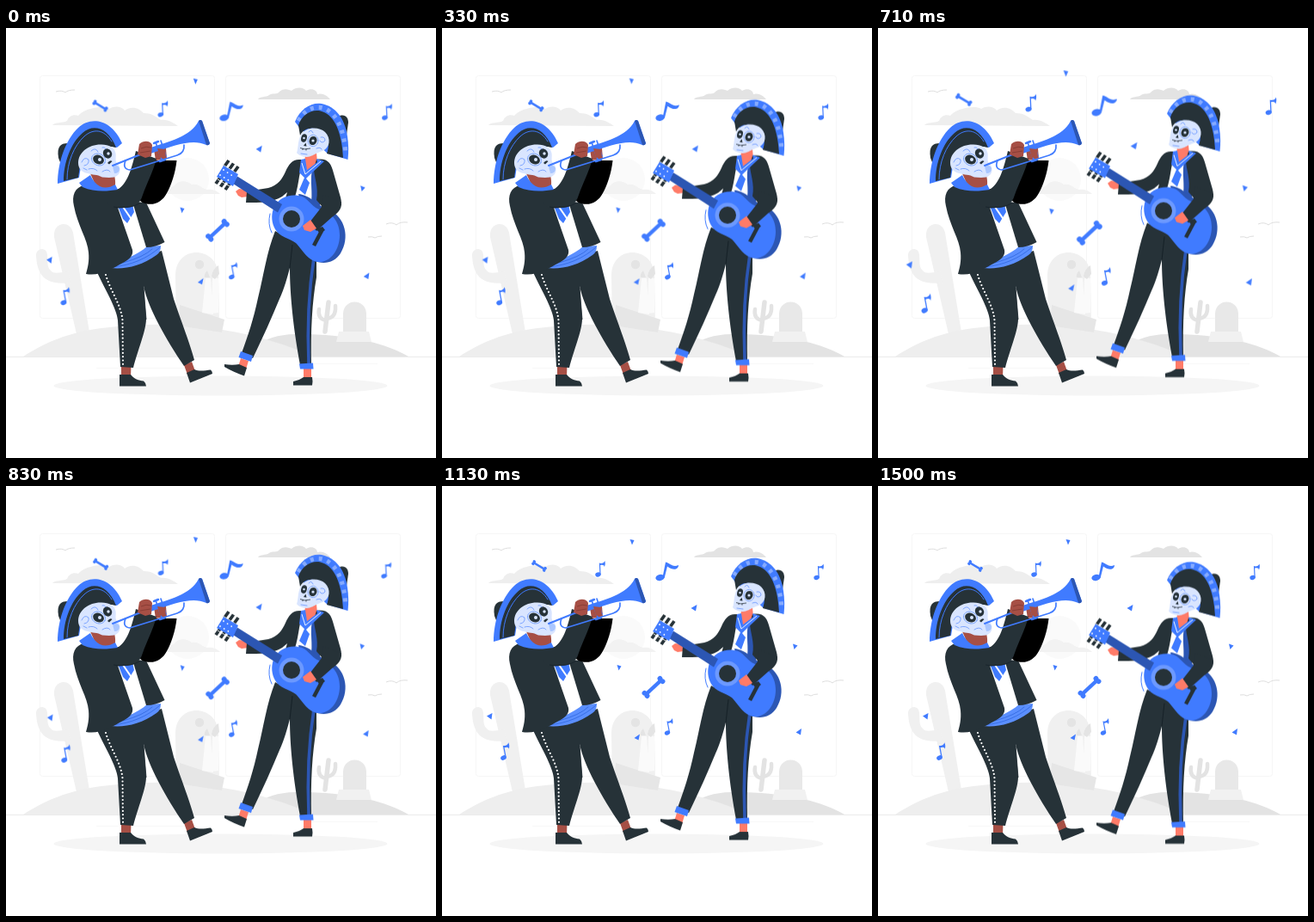
Recreate the animation shown at these times as an HTML page. Size 500 by 500 pixels, loop 1540 ms.

```html
<!DOCTYPE html>
<html lang="en">
<head>
<meta charset="utf-8">
<title>Skeleton musicians</title>
<style>
html, body { margin: 0; width: 100%; height: 100%; overflow: hidden; background: #fff; }
svg { display: block; width: 100vw; height: 100vh; }
.blue { fill: #407bff; }
.navy { fill: #2c56b3; }
.dark { fill: #263238; }
.white { fill: #fff; }
.bone { fill: #d9e5ff; }
.tan { fill: #a64f45; }
.pink { fill: #ff7b68; }
.line { fill: none; stroke: #407bff; stroke-linecap: round; stroke-linejoin: round; }
.float { transform-origin: 247.5px 190.5px; animation: beat 1540ms linear infinite; }
.player { animation: bob 1540ms linear infinite; }
@keyframes beat {
  0% { transform: scale(1.025); }
  7.34%, 46.3% { transform: scale(1.1); }
  26.82%, 36.56%, 56.04%, 100% { transform: scale(1); }
}
@keyframes bob {
  0% { transform: translateY(0); }
  46.3% { transform: translateY(-9.5px); }
  95%, 100% { transform: translateY(.5px); }
}
</style>
</head>
<body>
<svg viewBox="0 0 500 500">
  <defs>
    <g id="note">
      <ellipse rx="3.3" ry="2.5" transform="rotate(-18)"/>
      <path d="M1.9-.4 1.3-13.4C4-12.4 7-13.4 7.8-16 8.6-13.4 8.4-11 7.2-8.800 7.4-11 5.4-11.6 2.600-11L3.1 0Z"/>
    </g>
    <g id="rib">
      <path d="M-10-1.9H10V1.9H-10Z"/>
      <circle cx="-11" cy="-2" r="2.6"/><circle cx="-11" cy="2" r="2.6"/>
      <circle cx="11" cy="-2" r="2.6"/><circle cx="11" cy="2" r="2.6"/>
    </g>
  </defs>

  <!-- Scenery -->
  <g fill="none" stroke="#f6f6f6">
    <rect x="39.5" y="55.5" width="203" height="282" rx="3"/>
    <rect x="255.5" y="55.5" width="203" height="282" rx="3"/>
  </g>
  <path d="M0 382.500H500" stroke="#ebebeb"/>
  <path d="M105 395.500H131M137 395.500H215M350 390.500H432" stroke="#f8f8f8"/>
  <ellipse cx="249.500" cy="416" rx="194" ry="11.500" fill="#f5f5f5"/>
  <path fill="#eee" d="M54 113C57 109 65 111 71 108 73 102 79 100 84 102 90 94 112 89 120 94 126 90 135 91 138 96 146 90 155 93 160 99 171 99 175 104 180 107 189 106 195 111 200 114Z"/>
  <path fill="#e3e3e3" d="M293 83C295 79 302 81 306 78 309 75 315 78 318 74 323 69 330 72 332 73 338 68 346 69 349 73 355 69 362 72 362 77 368 75 374 79 377 83Z"/>
  <circle cx="211" cy="176" r="25" fill="#fafafa"/>
  <path fill="#f2f2f2" d="M180 193C182 184 190 188 196 183 202 176 211 178 216 182 224 180 228 187 234 188 241 187 246 190 249 193Z"/>
  <path fill="none" stroke="#dedede" d="M58 74Q65 72 69 75 72 72 80 72M442 228Q449 225 454 229 458 225 467 226M421 243Q426 242 429 244 432 242 437 242"/>
  <g fill="#f0f0f0">
    <path d="M83 360 56 243C54 226 74 222 78 238L98 360Z"/>
    <path d="M72 283C61 285 55 286 52 282 46 277 50 267 47 260 43 254 35 258 35 264 36 285 43 300 75 296Z"/>
    <path d="M198 345 197 287C198 252 245 253 247 287L248 346Z"/>
  </g>
  <circle cx="225" cy="275" r="5.200" fill="#e4e4e4"/>
  <path fill="#e3e3e3" d="M295 368C307 357 331 355 352 356 405 358 443 367 468 382H290Z"/>
  <path fill="#eee" d="M20 382C45 366 72 354 111 349 162 342 216 344 252 351 291 357 329 369 357 382Z"/>
  <path fill="#e6e6e6" d="M202 322 254 339 251 354 200 346Z"/>
  <path fill="#fafafa" d="M228 331 232 291 238 291 241 333ZM239 332 240 291H247L247 331Z"/>
  <path fill="#e4e4e4" d="M239 289Q240 280 247 276L248 286 243 292ZM231 290Q230 286 234 282L237 290Z"/>
  <g fill="none" stroke="#e3e3e3" stroke-width="5.500" stroke-linecap="round">
    <path d="M375 319 371 353"/>
    <path stroke-width="4.500" d="M364 327Q362 338 372 340M383 323Q384 337 373 338"/>
  </g>
  <path fill="#e8e8e8" d="M392 356V332C393 314 418 314 419 332V356Z"/>
  <path fill="#f1f1f1" d="M387 353H422L425 365H384Z"/>

  <!-- Trumpet player -->
  <path class="tan" d="M134 392H145.500L145 406H134ZM207 392 216 388 220 399 211 403Z"/>
  <path class="dark" d="M132 403H145C149 408 154 410 160 410.500Q163 413 163 416.500H132ZM210 401 219 397C225 400 232 398 238 397.500Q240 399 240 402L214 412.500Z"/>
  <path class="dark" d="M106 284C114 302 129 326 130 340L133 394 148 395C153 375 163 352 163 338L160 300C165 325 186 362 207 393L219 386C213 364 204 342 195 315L181 259Z"/>
  <path d="M160 302 163 339" stroke="#18242b" stroke-width=".8" fill="none"/>
  <path d="M116 287C121 305 134 322 135.500 340L136 392" fill="none" stroke="#fff" stroke-width="2.200" stroke-linecap="round" stroke-dasharray="0 4.300"/>
  <path class="white" d="M128 202 149 203 164 253 123 278Z"/>
  <path fill="#5b8fff" d="M121 279C132 270 154 264 164 254L180 253Q180 261 175 264C157 277 138 281 121 279Z"/>
  <path class="line" style="stroke:#3268dd" stroke-width=".8" d="M123 278C146 276 164 268 179 255M136 273Q161 266 170 257"/>
  <path class="dark" d="M147 202 163 203 184.500 249Q174 255 163 255Z"/>
  <path class="dark" d="M91 183C80 185 76 195 79 207 83 229 95 246 96 261 97 271 95 279 93 286 109 289 123 280 136 273 145 268 148 264 147 258L130 209V190Z"/>
  <path class="blue" d="M130 207 147 205 149 214 141 227 136 222Z"/>
  <path d="M136 208 147 224" stroke="#fff" stroke-width="2"/>
  <path d="M165 154H198.500C197 169 192 183 187 192 182 202 172 207 162 204 157 203 154 200 155 195Z"/>
  <path class="tan" d="M172 141C174 137 181 136 186 140L187 152 174 154Z"/>
  <path class="dark" d="M105 190 131 187C142 180 147 160 151 143L175 152C171 167 164 180 159 194 156 205 149 209 137 209L124 210Z"/>
  <path d="M125 208C138 210 150 208 156 203" fill="none" stroke="#17222a" stroke-width=".8"/>
  <path class="tan" d="M97 167 125 169C127 174 128 181 126 188L106 187Z"/>
  <path class="blue" d="M85 180 98 171Q102 180 109 184 117 188 127 182L130 188C117 190 103 191 89 185Z"/>

  <path class="dark" d="M72 134C63 134 59 138 61 151L66 164 78 142Z"/>
  <path class="blue" d="M60 181C60 157 69 130 84 116 98 103 122 105 135 134L129 139C111 134 94 144 88 155L85 174Z"/>
  <path class="dark" d="M67 178C67 157 75 134 89 122 101 111 119 115 128 139 111 135 91 141 86 160L84 174Z"/>
  <path class="line" stroke-width="1" d="M71 176C71 156 79 137 91 126 101 117 114 117 123 132"/>
  <path class="bone" d="M84 157C84 144 97 135 111 135.500 120 136 126 139 127 144 129 149 126 153 129 157 133 161 134 167 130 171 126 175 118 174 112 173.500 106 170 100 171 95 169 88 168 84 163 84 157Z"/>
  <path fill="#a9c6ff" d="M124 161Q130 158 132 163 132 169 126 169Z"/>
  <g class="dark">
    <ellipse cx="107.500" cy="153" rx="6.600" ry="5.200" transform="rotate(24 107.500 153)"/>
    <ellipse cx="118" cy="146" rx="5" ry="5.800" transform="rotate(-30 118 146)"/>
    <path d="M118 157Q121 153 123.500 155L120 158.500Z"/>
  </g>
  <circle cx="109" cy="153" r="2" fill="#d9e5ff"/><circle cx="119" cy="146" r="1.700" fill="#d9e5ff"/>
  <g class="line" stroke-width=".6">
    <ellipse cx="107.500" cy="153" rx="8.200" ry="6.700" transform="rotate(24 107.500 153)" stroke-dasharray="1.500 1"/>
    <path d="M88 156Q91 149 96 153 97 159 91 160M99 143Q104 138 107 144M112 139Q115 138 116 141M96 164Q102 162 106 166M112 167Q118 163 121 167M90 163 94 165"/>
  </g>

  <g class="line" stroke-width="2">
    <path d="M124 160 184 136"/>
    <path stroke-width="1.700" d="M139 154Q135 164 144 165L199 148Q208 145 207 136M174 133 181 153M180 131 186 149"/>
  </g>
  <path class="blue" d="M166 140C191 131 214 127 224 108Q226 106 228 108L237 134Q236 137 233 136C217 129 200 135 168 146Z"/>
  <path class="navy" d="M224 108Q226 106 228 108L237 134Q236 137 233 136Z"/>
  <path class="line" stroke-width="2.500" d="M172 134 177 132M179 155 185 153"/>
  <path class="tan" d="M155 135C160 130 168 131 170 136L169 149 162 151 153 147Z"/>
  <path class="tan" d="M176 140 185 141 186 150 179 151Z"/>
  <path fill="none" stroke="#7d352f" stroke-width=".7" d="M157 140Q163 137 169 139M156 145 168 143"/>

  <!-- Floating bits -->
  <g class="float blue">
    <use href="#note" x="181.500" y="103"/>
    <use href="#note" x="435.600" y="106.500"/>
    <use href="#note" transform="translate(71.500 316) rotate(-8) scale(1.050)"/>
    <use href="#note" transform="translate(262 287) rotate(-8)"/>
    <ellipse cx="253.500" cy="106.500" rx="5.200" ry="3.600" transform="rotate(-12 253.500 106.500)"/>
    <path d="M256.500 106 260 88.500C266 90 268 95 275 92 275 97 269 99 262 93.500L258.600 107Z"/>
    <use href="#rib" transform="translate(113 93) rotate(31) scale(.68)"/>
    <use href="#rib" transform="translate(246 234) rotate(-43) scale(1.120)"/>
    <path d="M218.500 62 223.500 63 221 68.500ZM52 267.500 58.500 264 57.500 271.500ZM289.500 142 296.500 138 295 145.500ZM203.500 208 208.500 209.500 205.500 214.500ZM223.500 293 230 288.500 228.500 295.500ZM408 183.500 413.500 185.500 409.500 190ZM411.500 286.500 418 282 417 289.500Z"/>
  </g>

  <!-- Guitar player -->
  <g class="player">
    <path class="pink" d="M273 384 282 387 279 397 270 394ZM346 395H355V408H346Z"/>
    <path class="dark" d="M254 391C260 392 266 392 271 391L280 395 277 404.500C269 402 261 398 254 394ZM334 411C339 410 343 408 346 406H356Q357 411 356 415.500H334Z"/>
    <path class="dark" d="M313 236C303 261 300 286 293 314 288 338 281 359 274 378L287 384C298 361 309 337 318 315 324 302 327 290 330 279 330 309 334 350 342 392H355C354 352 356 318 361 290V262Z"/>
    <path d="M330 279 333 252" fill="none" stroke="#121d24" stroke-width=".8"/>
    <path d="M358 267C352 306 350 345 352 390" fill="none" stroke="#2c56b3" stroke-width="3.600"/>
    <path class="blue" d="M273 376 287 381 285 388 270.500 383ZM341 390.500 357 389.500 357.500 396.500H342Z"/>
    <path class="white" d="M343 153 363 156 359 211 324 207Z"/>
    <path class="navy" d="M357 161 366 170 365 211 354 208C358 192 352 176 357 161Z"/>
    <path class="pink" d="M348 149 361 145 362 156 351 167 346 159Z"/>
    <path class="pink" d="M280 188 271 187 267 190 270 195 274 197 281 196Z"/>
    <path class="dark" d="M343 153C333 152 329 158 325 167 321 176 316 183 305 186L280 190 279 203C295 203 310 203 321 196L327 191 323 205H333C341 186 340 168 345 158Z"/>
    <path class="dark" d="M361 153C374 151 378 157 381 169L389 197C392 207 386 213 381 217L361 236 353 226 367 207 361 200C364 186 358 173 358 163Z"/>
    <path class="blue" d="M343 153 348 152 350 165 362 156 361 152 370 155 353 171 349 175 353 180 348 194 341 188 347 174 341 168Z"/>
    <path d="M344 157 348 170 366 155" fill="none" stroke="#fff" stroke-width=".9"/>

    <path class="navy" d="M340 193C354 194 362 207 375 211 395 220 400 244 389 262 382 273 369 276 357 270Z"/>
    <path class="blue" d="M311 210C315 199 328 193 340 195 351 196 354 207 364 211 381 215 388 227 388 241 388 258 377 273 363 272 351 271 345 258 337 250 329 244 318 243 313 234 309 227 308 218 311 210Z"/>
    <path class="line" stroke-width="1" d="M307 216Q304 228 309 238"/>
    <circle cx="332" cy="222" r="14.500" fill="#6c99ff"/>
    <circle cx="332" cy="222" r="10" class="dark"/>
    <path class="navy" d="M269 172.500 321 205 316 214.500 264 181Z"/>
    <g stroke="#263238" stroke-width="3.800">
      <path d="M254 161 259 154M259.500 164.500 264.500 157.500M265 168 270 161M244 181 249 174M249.500 184.500 254.500 177.500M255 188 260 181"/>
    </g>
    <g stroke="#fff" stroke-width=".9"><path d="M253 159.500 269 169.500M246 176 262 185"/></g>
    <path class="blue" d="M253 160 270 170 264 184 245 173Z"/>
    <path d="M253 165 265 173M249 171 262 179" fill="none" stroke="#fff" stroke-width="1.800" stroke-linecap="round" stroke-dasharray="0 5.500"/>
    <path d="M368 234 358 253" stroke="#263238" stroke-width="4.500"/>
    <path class="dark" d="M361 234 368 231 371 235 365 239Z"/>
    <path class="dark" d="M369 194 390 202C391 212 384 216 379 220L361 236 353 226 367 208Z"/>
    <path class="pink" d="M354 223 361 233 354 237 347 235 345 230Z"/>

    <path class="dark" d="M386 103C394 99 398 104 398 110L396 124 386 119Z"/>
    <path class="blue" d="M336 109C342 94 355 86 367 88 383 91 394 105 397 126Q399 140 397.500 153L374 146 342 117Z"/>
    <path d="M340 108C348 93 363 88 375 96 388 105 394 125 395 148" fill="none" stroke="#86abff" stroke-width="5" stroke-dasharray="4 6"/>
    <path class="dark" d="M340 113C344 100 358 92 370 98 385 105 391 128 392 151L373 146C379 131 370 119 358 117 350 116 345 119 342 125Z"/>
    <path class="bone" d="M343 124C348 115 364 114 371 121 378 128 377 139 368 143 361 145 358 148 353 149.500 347 151 340 148 338 145 340 140 339 131 343 124Z"/>
    <g class="dark">
      <ellipse cx="346.500" cy="128" rx="3.300" ry="4.800" transform="rotate(15 346.500 128)"/>
      <ellipse cx="357" cy="131" rx="4.400" ry="5.200" transform="rotate(25 357 131)"/>
      <path d="M346 137 348.500 133.500 349.500 137.500Z"/>
    </g>
    <circle cx="346.500" cy="128" r="1.300" fill="#d9e5ff"/><circle cx="357" cy="131" r="1.600" fill="#d9e5ff"/>
    <path d="M342 139.500Q347 142 354 140M345 140V142M349 140.500V142.500" fill="none" stroke="#263238" stroke-width=".8"/>
    <g class="line" stroke-width=".6">
      <ellipse cx="357" cy="131" rx="6" ry="6.600" stroke-dasharray="1.500 1"/>
      <path d="M352 121Q355 117 357 122M366 127Q371 126 371 131 367 135 365 131M361 140Q366 138 367 141M343 146 350 147"/>
    </g>
  </g>
</svg>
</body>
</html>
```
